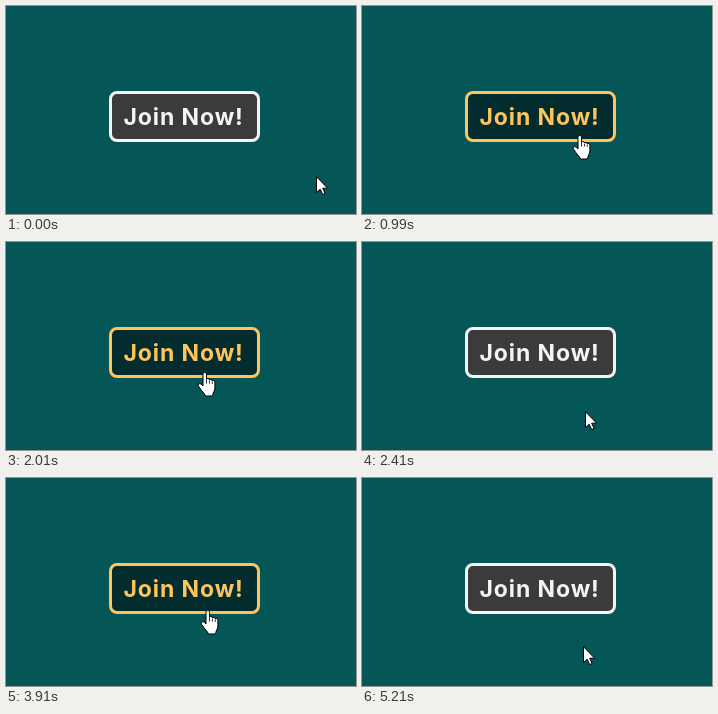
An HTML page that plays this animation: 350 by 208 pixels, repeating every 5610 ms.

```html
<!DOCTYPE html>
<html lang="en">
<head>
<meta charset="utf-8">
<title>Join button</title>
<style>
  html, body { margin: 0; width: 100%; height: 100%; overflow: hidden; background: #055657; }
  svg { display: block; width: 350px; height: 208px; color: #f4f4f4; }
  rect { fill: #3b3b3b; stroke: currentColor; stroke-width: 3; }
  text { fill: currentColor; font: 700 23px Orbitron, Inter, sans-serif; letter-spacing: .9px; }
  path { fill: #fff; stroke: #000; stroke-linejoin: round; }
  .crease { fill: none; stroke-width: .8; }
  .hover { color: #ffc45c; }
  .hover rect { fill: #022c2d; }
  .hover #arrow, svg:not(.hover) #hand { display: none; }
</style>
</head>
<body>
<svg id="stage" viewBox="0 0 350 208">
  <rect x="104.5" y="86.5" width="148" height="48" rx="6.5"/>
  <text x="117.5" y="119">Join Now!</text>
  <g id="cursor">
    <path id="arrow" d="M.5.7V16.6L4.2 13.2 6.7 18.6 9.1 17.5 6.7 12.2H11.6Z"/>
    <g id="hand" transform="translate(-6.5 -1)">
      <path d="M5.5 14V2.3C5.5 0 9 0 9 2.3V7.5C9.4 6 12 6.2 12 8C12.4 6.9 14.7 7.1 14.8 9C15.2 8 17.4 8.3 17.4 10.3V16C17.4 19 15.4 20.5 15.4 22.3Q15.4 24 13.6 24H9Q7.2 24 7 22C5 19.4 2.6 17 1 14.2C-.1 12 2.4 10.9 4 12.5Z"/>
      <path class="crease" d="M9 8V11.5M12 8.5V11.5M14.8 9.5V12"/>
    </g>
  </g>
</svg>
<script>
const LOOP = 5610, TICK = 95, BUTTON_BOTTOM = 135;
const START = [310, 170], INSIDE = [197, 121];
const stage = document.getElementById("stage");
const cursor = document.getElementById("cursor");

const easeIn = power => p => p ** power;
const easeOut = power => p => 1 - (1 - p) ** power;
const leave = [easeIn(3), easeIn(1.4)];

// each move advances in equal ticks, with one easing per axis
const moves = [
  { at: 700, ticks: 6, to: INSIDE, ease: [easeOut(1.57), easeOut(1.57)] },
  { at: 1910, ticks: 6, to: [223, 169], ease: leave },
  { at: 3720, ticks: 6, to: INSIDE, ease: [easeOut(2.75), easeOut(2)] },
  { at: 4920, ticks: 4, to: [221, 168], ease: leave }
];

function pointer(t) {
  let pos = START;
  for (const { at, ticks, to, ease } of moves) {
    if (t < at) break;
    const p = Math.min(1, (Math.floor((t - at) / TICK) + 1) / ticks);
    pos = pos.map((from, axis) => from + (to[axis] - from) * ease[axis](p));
  }
  return pos.map(Math.round);
}

function draw() {
  const [x, y] = pointer(performance.now() % LOOP);
  cursor.setAttribute("transform", `translate(${x} ${y})`);
  stage.classList.toggle("hover", y < BUTTON_BOTTOM);
  requestAnimationFrame(draw);
}
draw();
</script>
</body>
</html>
```
